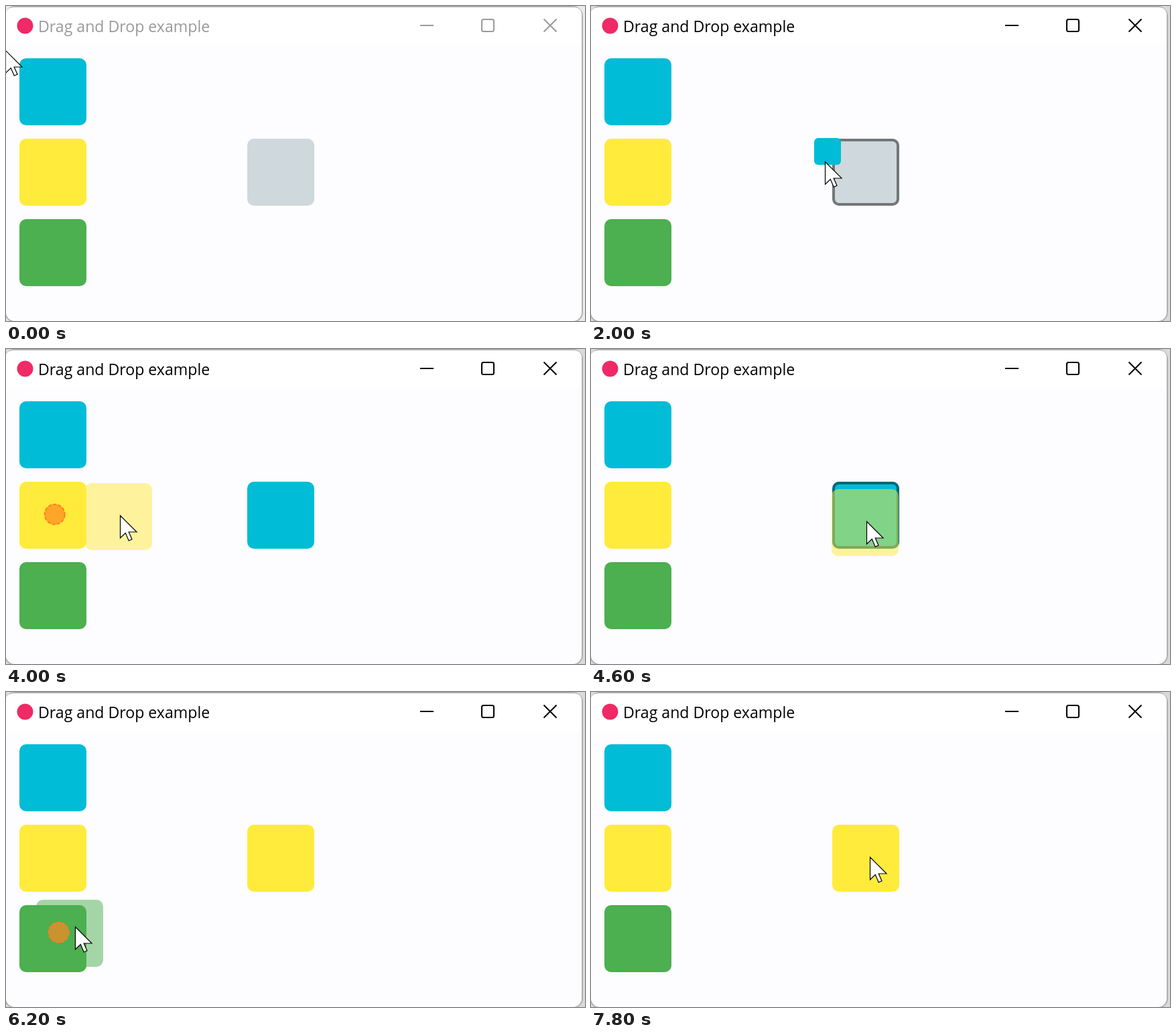
These frames come from a looping animation (864 px wide and 470 px high, 8000 ms). An HTML page:

```html
<!DOCTYPE html>
<html lang="en">
<head>
<meta charset="utf-8">
<title>Drag and Drop example</title>
<style>
  html, body { margin: 0; width: 100%; height: 100%; overflow: hidden; }
  svg { display: block; width: 864px; height: 470px; }
  #backdrop { fill: #dadada; }
  #panel { fill: #fdfcff; stroke: #b0b0b0; stroke-width: 2; }
  #title { font: 23.1px "Open Sans", "Noto Sans", sans-serif; fill: #000; }
  #buttons { fill: none; stroke: #000; stroke-width: 2; }
  .idle #backdrop { fill: #ebebeb; }
  .idle #title { fill: #999; }
  .idle #buttons { stroke: #999; }
  #edge { fill: none; stroke-width: 4; }
  #press { fill: rgba(255, 136, 33, .7); stroke: #ff7f20; stroke-width: 2; stroke-dasharray: 5.5 2; }
  #cursor { fill: #fff; stroke: #000; stroke-width: 1.2; }
</style>
</head>
<body>
<svg id="stage" viewBox="0 0 864 470">
  <rect id="backdrop" width="864" height="470"/>
  <rect id="panel" x="-1" y="1" width="861" height="470" rx="14"/>
  <path d="M0 58V8Q3 2 12 2H847Q859 2 859 14V58Z" fill="#fff"/>
  <circle cx="28.5" cy="29.5" r="12" fill="#ef2a66"/>
  <text id="title" x="48" y="39">Drag and Drop example</text>
  <g id="buttons">
    <path d="M618 29H638M802.5 19.5L821.5 38.5M821.5 19.5L802.5 38.5"/>
    <rect x="710" y="20" width="18" height="18" rx="2.5"/>
  </g>
  <rect x="20" y="78" width="100" height="100" rx="10" fill="#00bcd6"/>
  <rect x="20" y="198" width="100" height="100" rx="10" fill="#ffeb3b"/>
  <rect x="20" y="318" width="100" height="100" rx="10" fill="#4caf50"/>
  <rect id="slot" x="360" y="198" width="100" height="100" rx="10"/>
  <rect id="edge" x="362" y="200" width="96" height="96" rx="8"/>
  <rect id="ghost"/>
  <circle id="press" r="15"/>
  <path id="cursor" d="M.5 .5V34L8.3 26.5L13.2 38L18 36L13.2 25H25Z"/>
</svg>
<script>
const STEP = 200, LOOP = 8000;
const CYAN = '#00bcd6', YELLOW = '#ffeb3b', GREEN = '#4caf50', EMPTY = '#cfd8dc';
const GREY_EDGE = 'rgba(0,0,0,.45)', RED_EDGE = '#f44336';

// Pointer tip per step, with an optional offset of the dragged tile
const path = [
  [-1, 66], [5, 72], [13, 81], [22, 91], [32, 101], [40, 108], [44, 112],
  [60, 118], [180, 165], [368, 226], [349, 232, 8, -1], [366, 234],
  [388, 236, -4, -6], [404, 248, -6, -5], [421, 262, -8, -7],
  [424, 272], [350, 296], [190, 276], [72, 246], [72, 246],
  [170, 248], [280, 245], [372, 250], [411, 257], [411, 257],
  [411, 257], [310, 296], [160, 342], [78, 358], [78, 358], [78, 358],
  [103, 350], [230, 306], [370, 258], [416, 246]
];

// Steps at which each tile is pressed, enters the slot and is released
const drags = [
  { press: 6, enter: 9, drop: 15, top: 78, color: CYAN, size: 40, rx: 6, alpha: 1, edge: GREY_EDGE },
  { press: 19, enter: 22, drop: 25, top: 198, color: YELLOW, size: 100, rx: 10, alpha: .5, edge: GREY_EDGE },
  { press: 30, enter: 33, drop: 39, top: 318, color: GREEN, size: 100, rx: 10, alpha: .5, edge: RED_EDGE }
];

const el = id => document.getElementById(id);
const set = (id, attrs) => {
  for (const k in attrs) el(id).setAttribute(k, attrs[k]);
};
const show = (id, on) => set(id, { visibility: on ? 'visible' : 'hidden' });

function draw(step) {
  const [x, y, dx = 0, dy = 0] = path[Math.min(step, path.length - 1)];
  const drag = drags.find(d => step >= d.press && step < d.drop);

  el('stage').classList.toggle('idle', step < drags[0].press);
  set('cursor', { transform: `translate(${x} ${y})` });
  set('slot', { fill: step >= drags[1].drop ? YELLOW : step >= drags[0].drop ? CYAN : EMPTY });

  show('ghost', drag && step > drag.press);
  show('press', drag && step < drag.press + 2);
  show('edge', drag && step >= drag.enter);
  if (!drag) return;

  const [px, py] = path[drag.press];
  set('press', { cx: px + .7, cy: py + .7 });
  set('edge', { stroke: drag.edge });
  set('ghost', {
    x: 20 + x - px + dx, y: drag.top + y - py + dy,
    width: drag.size, height: drag.size, rx: drag.rx,
    fill: drag.color, opacity: drag.alpha
  });
}

const start = performance.now();
function tick() {
  draw(Math.floor((performance.now() - start) % LOOP / STEP));
  requestAnimationFrame(tick);
}
tick();
</script>
</body>
</html>
```
